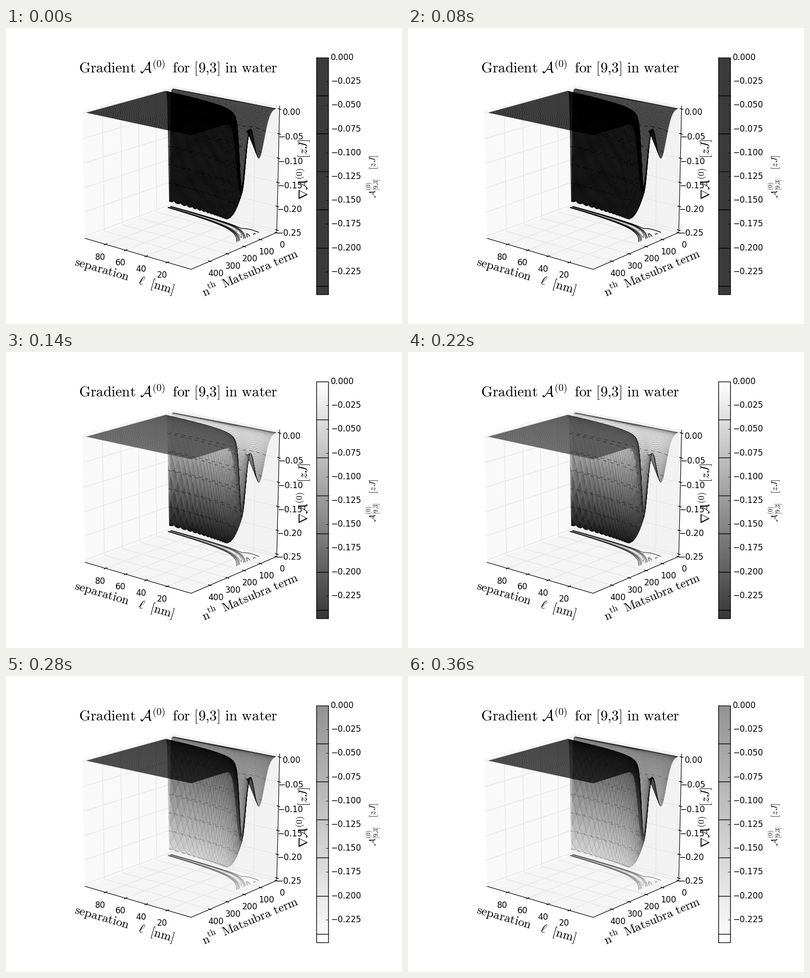
Recreate the animation shown at these times as a matplotlib script. Size 800 by 600 pixels, loop 420 ms.

```python
import numpy as np
import matplotlib.pyplot as plt
from matplotlib.animation import ArtistAnimation
from matplotlib.collections import PolyCollection

plt.rcParams.update({"font.family": "DejaVu Sans", "mathtext.fontset": "cm"})
fig = plt.figure(figsize=(8, 6), dpi=100, facecolor="white")
ax = fig.add_axes([0, 0, 1, 1])
ax.axis("off")

PX = 0.72  # points per pixel
TURN, TILT = np.radians(39.7), np.radians(17.3)
Z_MIN = -0.25


def project(u, v, w):
    """Unit box to pixels and depth: u runs right, v forward, w up."""
    u, v, w = u - 0.5, v - 0.5, w - 0.5
    x = u * np.cos(TURN) - v * np.sin(TURN)
    f = u * np.sin(TURN) + v * np.cos(TURN)
    depth = 10 - f * np.cos(TILT) - w * np.sin(TILT)
    y = f * np.sin(TILT) - w * np.cos(TILT)
    return 354.7 + 2789 * x / depth, 293.5 + 2700 * y / depth, depth


def sep_u(s):
    return 0.202 + (80 - s) * 0.00973


def term_v(n):
    return 0.005 + n * 0.00197


def z_w(z):
    return 0.977 + z * 3.83


def ramp(x, lo, hi):
    t = np.clip((x - lo) / (hi - lo), 0, 1)
    return t * t * (3 - 2 * t)


def well(q, centre, width):
    return np.exp(-((q - centre) / width) ** 2)


def rim(u):
    """How far forward the valley reaches."""
    return 0.1 / (1.16 - u)


def height(u, v):
    """One valley that splits into two towards small separations."""
    q, split = v / rim(u), ramp(u, 0.6, 0.97)
    main = (0.242 - 0.097 * split) * well(q, 0.62 + 0.17 * split, 0.16 - 0.03 * split)
    return -main - 0.09 * split * well(q, 0.375, 0.16)


def stroke(pts, width=1.4, color="black", z=40, **kw):
    x, y = np.array(pts, float).T[:2]
    return ax.plot(x, y, color=color, lw=width * PX, zorder=z, **kw)[0]


def label(x, y, text, size=12, ha="center", va="center", rot=0):
    ax.text(x, y, text, fontsize=size, ha=ha, va=va, rotation=rot, zorder=50)


def number(value, digits):
    return f"{value:.{digits}f}".replace("-", "\u2212")


# Panes and grid
def pane(corners, gray):
    ax.fill(*np.array([project(*c)[:2] for c in corners]).T, color=str(gray), lw=0, zorder=0)


def grid(*pts):
    stroke([project(*p) for p in pts], color="0.9", z=1)


pane([(0, 0, 0), (0, 1, 0), (0, 1, 1), (0, 0, 1)], 0.975)
pane([(0, 0, 0), (1, 0, 0), (1, 0, 1), (0, 0, 1)], 0.95)
pane([(0, 0, 0), (1, 0, 0), (1, 1, 0), (0, 1, 0)], 0.9625)
stroke([project(0, 1, 0), project(1, 1, 0), project(1, 0, 0), project(1, 0, 1)], 1.2)


def tick(point, slope, text, dx, dy):
    x, y, _ = point
    stroke([(x - 2.8, y - 2.8 * slope), (x + 2.8, y + 2.8 * slope)])
    label(x + dx, y + dy, text)


for s in range(20, 100, 20):
    u = sep_u(s)
    grid((u, 1, 0), (u, 0, 0), (u, 0, 1))
    tick(project(u, 1, 0), -0.42, str(s), -10.5, 26)
for n in range(0, 500, 100):
    v = term_v(n)
    grid((1, v, 0), (0, v, 0), (0, v, 1))
    tick(project(1, v, 0), 0.35, str(n), 12, 25)
for k in range(6):
    w = z_w(-0.05 * k)
    grid((0, 1, w), (0, 0, w), (1, 0, w))
    tick(project(1, 0, w), 0.33, number(-k / 20 or 0, 2), 24.5, 6.5)

label(348, 91, r"$\mathrm{Gradient}\ \mathcal{A}^{(0)}\ \,\mathrm{for\ [9{,}3]\ in\ water}$",
      21.2, va="baseline")
label(238.5, 503.5, r"$\mathrm{separation}\quad\ell\ \ \mathrm{[nm]}$", 18, rot=-16.2)
label(493.5, 497, r"$\mathrm{n}^{\mathrm{th}}\ \,\mathrm{Matsubra\ term}$", 18, rot=23)
label(601, 287, r"$\nabla\mathcal{A}^{(0)}\ \ \,[zJ]$", 18, rot=90)
label(742, 301, r"$\mathcal{A}^{(0)}_{[9{,}3]}\quad\,[zJ]$", 13, rot=90)

# Colour bar frame
LEFT, RIGHT, TOP, BOTTOM = 627.2, 651.2, 60, 540
PER_UNIT = 1928  # bar pixels per unit of z
stroke([(LEFT, TOP), (RIGHT, TOP), (RIGHT, BOTTOM), (LEFT, BOTTOM), (LEFT, TOP)])
for k in range(10):
    y = TOP + 0.025 * k * PER_UNIT
    stroke([(RIGHT - 5, y), (RIGHT, y)], 0.8)
    label(656, y, number(-k / 40 or 0, 3), ha="left")
levels = -0.04 * np.arange(6, 0, -1)
for level in levels:
    y = TOP - level * PER_UNIT
    stroke([(LEFT, y), (RIGHT, y)])

# Surface mesh, far cells first
U, V = np.meshgrid(np.linspace(0.005, 0.97, 92), 0.965 * np.linspace(0, 1, 140) ** 1.6)
Z = height(U, V)
X, Y, D = project(U, V, z_w(Z))


def corners(a):
    return np.stack([a[:-1, :-1], a[:-1, 1:], a[1:, 1:], a[1:, :-1]], axis=-1).reshape(-1, 4)


order = np.argsort(-corners(D).mean(1))
cells = np.stack([corners(X), corners(Y)], axis=-1)[order]
cell_z = corners(Z).mean(1)[order]
cell_dark = 0.48 * ramp(corners(V / rim(U)).mean(1)[order], 0.82, 1.05)


def surface(gray, alpha, wire):
    """Gray faces, with a black veil where the sheet is flat."""
    cover = 1 - (1 - alpha) * (1 - cell_dark)
    tone = gray(cell_z) * alpha * (1 - cell_dark) / cover
    faces = PolyCollection(cells, facecolors=np.column_stack([tone, tone, tone, cover]),
                           edgecolors=[(0, 0, 0, wire)], linewidths=0.4 * PX, zorder=10)
    return ax.add_collection(faces)


def colour_bar(gray, alpha):
    i = np.arange(480)
    cover = 1 - (1 - alpha) ** np.where(i % 3 == 0, 1.4, 1)
    rows = 1 - cover * (1 - gray(-i / PER_UNIT))
    return ax.imshow(np.repeat(rows[:, None, None], 3, axis=2), aspect="auto",
                     extent=(LEFT, RIGHT, BOTTOM, TOP), interpolation="nearest", zorder=5)


def contour(w, level, tone, alpha, z, style="solid", cols=slice(None)):
    x, y, _ = project(U, V, w)
    return ax.contour(x[:, cols], y[:, cols], Z[:, cols], [level], colors=[str(tone)],
                      alpha=alpha, linewidths=1.4 * PX, linestyles=[style], zorder=z)


def scene(gray, alpha, wire, ink):
    items = [colour_bar(gray, alpha), surface(gray, alpha, wire)]
    for level in levels:
        tone = 0.8 * ramp(-level, 0.08, 0.24)
        items.append(contour(0.005, level, tone, ink, 6, cols=slice(0, 86)))
        items.append(contour(z_w(level), level, 0, 0.6 * ink, 12, (0, (5, 5))))
    return items


frames = [
    scene(lambda z: 0 * z, 0.73, 0.15, 1.0),
    scene(lambda z: 1 - z / Z_MIN, 0.75, 0.28, 0.65),
    scene(lambda z: z / Z_MIN, 0.39, 0.2, 0.38),
]

ax.set_xlim(0, 800)
ax.set_ylim(600, 0)
anim = ArtistAnimation(fig, frames, interval=140, repeat=True, repeat_delay=0, blit=False)
plt.show()
```
